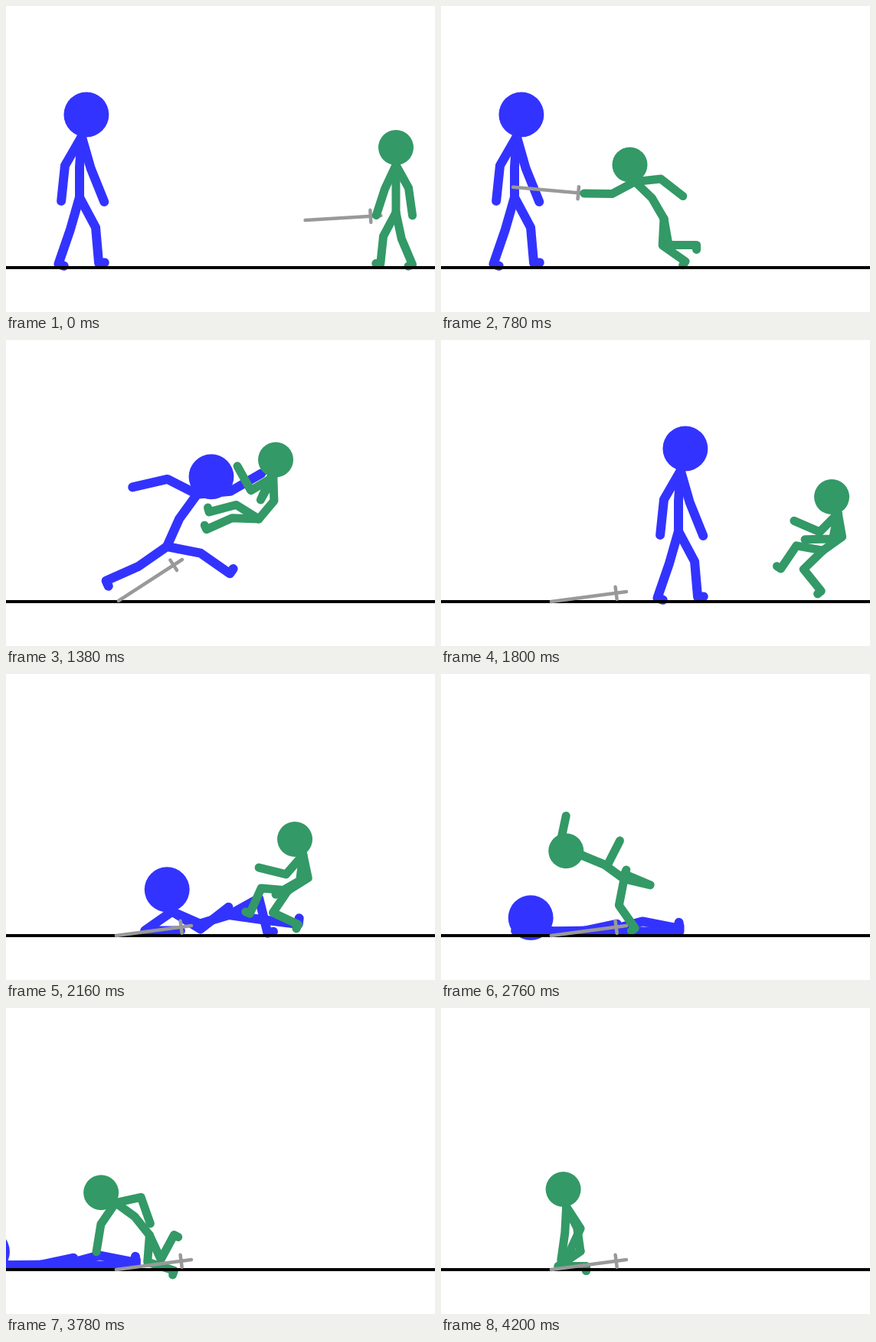
These frames come from a looping animation (560x400 px, 4.26 s). An HTML page with a canvas:

```html
<!DOCTYPE html>
<html lang="en">
<head>
<meta charset="utf-8">
<title>Stick fight</title>
<style>
  html, body { margin: 0; width: 100%; height: 100%; overflow: hidden; background: #fff; }
  canvas { display: block; width: 560px; height: 400px; }
</style>
</head>
<body>
<canvas id="stage" width="560" height="400"></canvas>
<script>
const ctx = document.getElementById('stage').getContext('2d');
const LOOP = 4260, STEP = 60, START = 420, DROP = 1020;
const PUNCHES = [2820, 3120, 3420];
const BONE = { spine: 31, head: 23, upperArm: 34, foreArm: 36.5, thigh: 35, shin: 36.5, foot: 6 };

// A pose is the hip position and the bone angles in degrees (0 right, 90 down):
// spine low, high, head; two arms of upper, fore; two legs of thigh, shin
const pose = (hip, spine, armA, armB, legA, legB) =>
  ({ hip, angles: [...spine, ...armA, ...armB, ...legA, ...legB] });

const move = (p, dx, dy = 0) => ({ ...p, hip: [p.hip[0] + dx, p.hip[1] + dy] });

const lerp = (a, b, k) => a + (b - a) * k;
const turn = (a, b, k) => a + (((b - a) % 360 + 540) % 360 - 180) * k;

// Finds the pair of keys around t and the progress between them
function span(keys, t) {
  let i = 0;
  while (i < keys.length - 2 && t >= keys[i + 1][0]) i++;
  const [a, b] = [keys[i], keys[i + 1]];
  const k = Math.min(1, Math.max(0, (t - a[0]) / (b[0] - a[0])));
  return [a, b, k];
}

function poseAt(keys, t) {
  const [[, a], [, b], k] = span(keys, t);
  return {
    hip: a.hip.map((v, i) => lerp(v, b.hip[i], k)),
    angles: a.angles.map((v, i) => turn(v, b.angles[i], k))
  };
}

// Builds the limbs of a figure from its pose
function skeleton(fig, t) {
  const { hip, angles: a } = poseAt(fig.keys, t);
  const bone = ([x, y], name, deg) => {
    const r = BONE[name] * fig.scale, w = deg * Math.PI / 180;
    return [x + r * Math.cos(w), y + r * Math.sin(w)];
  };
  const mid = bone(hip, 'spine', a[0]);
  const neck = bone(mid, 'spine', a[1]);
  const head = bone(neck, 'head', a[2]);
  const arm = i => {
    const elbow = bone(neck, 'upperArm', a[i]);
    return [neck, elbow, bone(elbow, 'foreArm', a[i + 1])];
  };
  const leg = i => {
    const knee = bone(hip, 'thigh', a[i]);
    const ankle = bone(knee, 'shin', a[i + 1]);
    return [hip, knee, ankle, bone(ankle, 'foot', a[i + 1] - 90 * fig.facing)];
  };
  const arms = [arm(3), arm(5)];
  return { head, hand: arms[0][2], limbs: [[hip, mid, neck, head], ...arms, leg(7), leg(9)] };
}

const bStand = pose([96, 250], [-90, -86, -78], [120, 96], [74, 68], [106, 109], [62, 85]);
const bPunch = pose([210, 270], [-66, -54, -51], [207, 167], [-5, -30], [145, 156], [11, 35]);
const bFall = pose([291, 315], [163, 204, -103], [145, 0], [32, -38], [-29, 76], [8, 7]);
const bFlat = pose([220, 335], [179, 179, 217], [181, 0], [0, -12], [-15, 11], [2, 0]);

const gStand = pose([509, 270], [-90, -90, -90], [115, 108], [61, 82], [118, 96], [78, 67]);
const gStab = pose([291, 278], [-120, -136, -107], [152, 181], [-6, 38], [93, 35], [80, 0]);
const gHit = pose([330, 234], [-50, -92, -82], [149, 241], [119, -66], [212, 165], [182, 156]);
const gCrouch = pose([368, 283], [-32, -102, -118], [131, 194], [97, 150], [185, 114], [124, 25]);
const gRaise = pose([239, 268], [216, 203, 196], [209, -78], [22, -63], [101, 55], [13, 203]);
const gPound = pose([196, 283], [211, 198, 185], [145, 100], [-58, 41], [60, 30], [11, 257]);
const gKneel = pose([182, 318], [262, 243, 260], [93, 98], [57, 115], [146, 0], [146, 0]);

const blue = {
  color: '#3333ff', width: 12, scale: 1.28, facing: 1,
  keys: [
    [START, bStand], [DROP, bStand], [1380, bPunch], [1500, move(bPunch, 35)],
    [1800, move(bStand, 214)], [2040, move(bStand, 210)], [2160, bFall],
    [2340, move(bFlat, 60)], [2580, move(bFlat, 45)], [2760, bFlat],
    [3420, move(bFlat, -30)], [3660, move(bFlat, -85)], [4200, move(bFlat, -340)]
  ]
};
const green = {
  color: '#339966', width: 11, scale: 1, facing: -1,
  keys: [
    [START, gStand], [780, gStab], [DROP, move(gStab, 4)], [1200, move(gStand, -209)],
    [1380, gHit], [1500, move(gHit, 140)], [1620, move(gHit, 180, 10)],
    [1740, move(gCrouch, 150)], [2040, move(gHit, 90, 10)], [2160, gCrouch],
    [2340, move(gStand, -66)], [2520, move(gHit, -5, 20)],
    ...PUNCHES.flatMap((at, i) => [
      [at - 60, move(gRaise, -5 * i)],
      [at, move(gPound, 20 - 10 * i)],
      [at + 120, move(gPound, 15 - 10 * i)]
    ]),
    [4140, gKneel]
  ]
};

// Sword keys: time, hilt x, hilt y, blade angle
const sword = [
  [START, 489, 272, 176.5], [780, 192, 246, 185], [DROP, 196, 246, 185],
  [1380, 230, 287, 147], [1560, 242, 329, 172.5]
];

function line(points, color, width) {
  ctx.strokeStyle = color;
  ctx.lineWidth = width;
  ctx.beginPath();
  points.forEach(([x, y]) => ctx.lineTo(x, y));
  ctx.stroke();
}

function drawFigure(fig, { head, limbs }) {
  limbs.forEach(l => line(l, fig.color, fig.width));
  ctx.fillStyle = fig.color;
  ctx.beginPath();
  ctx.arc(...head, BONE.head * fig.scale, 0, 7);
  ctx.fill();
}

function drawSword(t, hand) {
  const [a, b, k] = span(sword, t);
  let [x, y, deg] = [1, 2, 3].map(i => lerp(a[i], b[i], k));
  if (t < DROP) [x, y] = [hand[0] + 6, hand[1] + 0.5];
  ctx.save();
  ctx.translate(x, y);
  ctx.rotate(deg * Math.PI / 180);
  line([[0, 0], [99, 0]], '#999', 4.5);
  line([[13.5, -8], [13.5, 8]], '#999', 4.5);
  ctx.restore();
}

function drawRings(t) {
  PUNCHES.forEach((at, i) => {
    const n = (t - at) / STEP;
    if (n < 0 || n > 3) return;
    ctx.lineWidth = 4;
    ctx.strokeStyle = '#c8c8c8';
    ctx.beginPath();
    ctx.arc(110 - 10 * i, 302, 33 + 134 * n, 0, 7);
    ctx.stroke();
  });
}

function draw(t) {
  const b = skeleton(blue, t), g = skeleton(green, t), held = t < DROP;
  ctx.fillStyle = '#fff';
  ctx.fillRect(0, 0, 560, 400);
  ctx.lineCap = ctx.lineJoin = 'round';
  drawFigure(blue, b);
  if (held) drawSword(t, g.hand);
  drawFigure(green, g);
  ctx.fillStyle = '#000';
  ctx.fillRect(0, 340, 560, 4);
  if (!held) drawSword(t, g.hand);
  drawRings(t);
}

const begin = performance.now();
function tick() {
  const t = (performance.now() - begin) % LOOP;
  draw(Math.floor(t / STEP) * STEP);
  requestAnimationFrame(tick);
}
tick();
</script>
</body>
</html>
```
